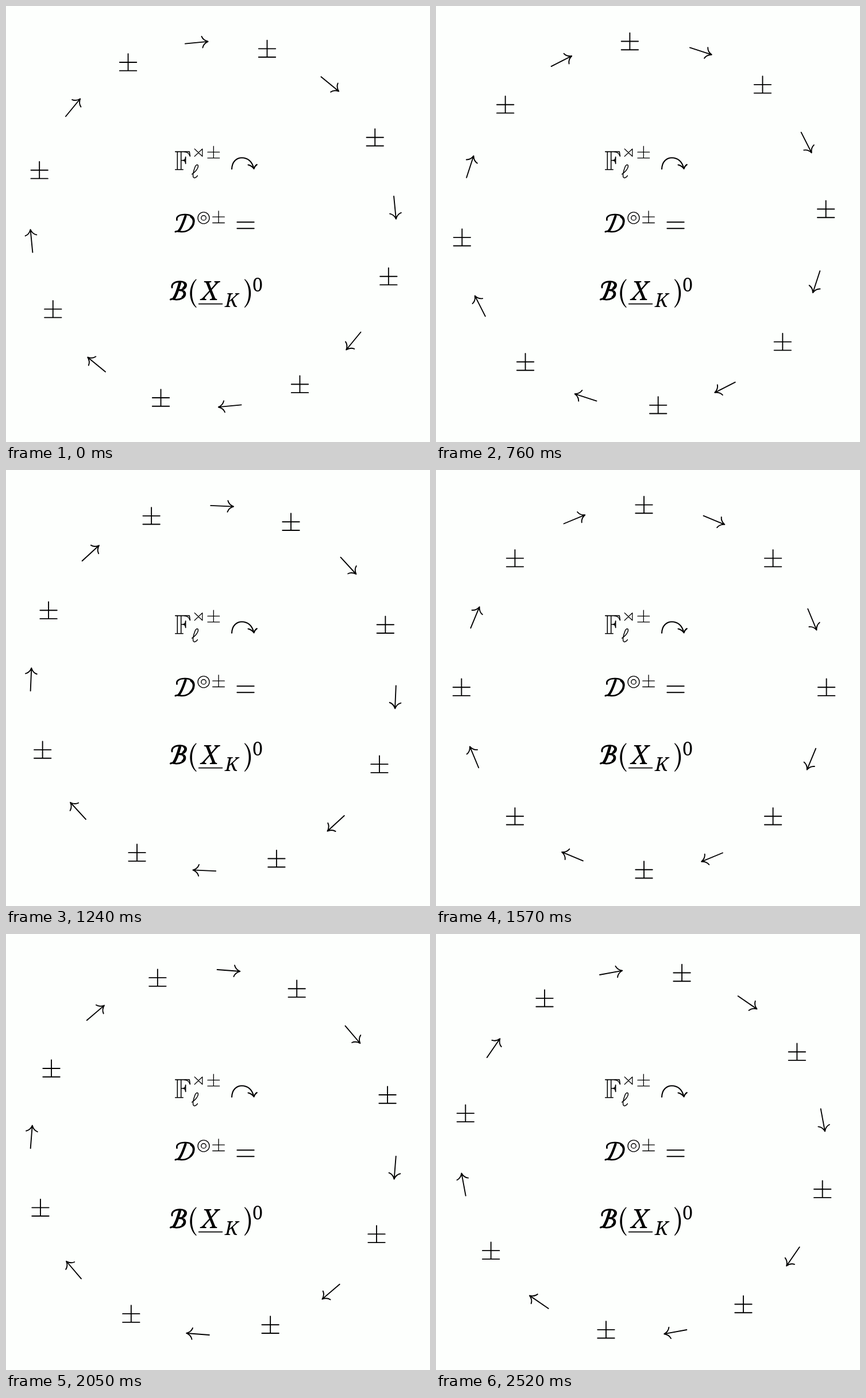
Recreate the animation shown at these times as an HTML page with a canvas. Size 738 by 759 pixels, loop 2560 ms.

```html
<!DOCTYPE html>
<html lang="en">
<head>
<meta charset="utf-8">
<title>Rotating symmetry ring</title>
<style>
html, body { margin: 0; width: 100%; height: 100%; overflow: hidden; background: #fdfffd; }
canvas { display: block; }
</style>
</head>
<body>
<canvas id="stage" width="738" height="759"></canvas>
<script>
const ctx = document.getElementById("stage").getContext("2d");
const LOOP = 2560, RADIUS = 317.6;

// Runs of steps: first time, last time, number of steps.
const runs = [[380, 900, 12], [950, 1430, 11], [1480, 2000, 12], [2050, 2520, 11]];
const times = [0];
for (const [from, to, n] of runs) {
  for (let i = 0; i < n; i++) {
    times.push(Math.round((from + (to - from) * i / (n - 1)) / 10) * 10);
  }
}

// Ring angle: step, degrees.
const keys = [[0, 16.93], [5, 28.93], [14, 55.07], [19, 69.95], [26, 90], [36, 117], [46, 147]];

function angleAt(t) {
  let step = 0;
  while (step + 1 < times.length && times[step + 1] <= t) step++;
  let i = 0;
  while (i < keys.length - 2 && keys[i + 1][0] <= step) i++;
  const [s0, a0] = keys[i], [s1, a1] = keys[i + 1];
  return a0 + (a1 - a0) * (step - s0) / (s1 - s0);
}

function stroke(d, width, cap = "round") {
  ctx.lineWidth = width;
  ctx.lineCap = cap;
  ctx.lineJoin = "round";
  ctx.stroke(new Path2D(d));
}

function fill(d) {
  ctx.fill(new Path2D(d));
}

function plusMinus(x, y, size = 1) {
  const r = 14.7 * size;
  stroke(`M${x - r} ${y}H${x + r}M${x} ${y - r}V${y + r}M${x - r} ${y + r}H${x + r}`, 1.88 * size);
}

function drawArrow(deg) {
  ctx.save();
  ctx.translate(360.7, 380);
  ctx.rotate(deg * Math.PI / 180);
  ctx.translate(1.8, -RADIUS);
  stroke("M-19.9 0H19.6M9.8 -9.9Q11.8 -2.8 20 0Q11.8 2.8 9.8 9.9", 1.88);
  ctx.restore();
}

function drawRing(deg) {
  for (let i = 0; i < 8; i++) {
    const a = (deg + i * 45) * Math.PI / 180;
    plusMinus(362 + RADIUS * Math.sin(a), 378.2 - RADIUS * Math.cos(a));
    drawArrow(deg + i * 45 + 22.5);
  }
}

// Places the ink of a character around x, on the baseline y.
function letter(ch, x, y, font) {
  ctx.font = font + " 'Noto Serif', 'Liberation Serif', serif";
  const m = ctx.measureText(ch);
  ctx.fillText(ch, x - (m.actualBoundingBoxRight - m.actualBoundingBoxLeft) / 2, y);
}

function drawTopLine() {
  // double-struck F
  stroke("M294.7 253.6H319.2L320.4 261.5M294.7 284.7H308.2M298.3 253.6V284.7M304.7 253.6V284.7" +
         "M304.7 268.7H312M312.6 262.8V274.4", 1.6);
  stroke("M310.5 253.8Q318 254.5 320.2 261.3M308 268.7Q312 268.2 312.6 263.3M308 268.7Q312 269.2 312.6 274", 1.3);
  // script l
  stroke("M323.6 292.8C328.5 289.6 334.8 283.1 334.4 278.4C334 275.1 330.6 276 329 280.2" +
         "C327 285.6 324.8 292.6 325.7 296.9C326.6 300.8 331.2 299.2 333.3 295.3", 1.5);
  stroke("M328.2 248.8L341.8 261.8M328.2 261.8L341.8 248.8M341.8 248.8V261.8", 1.25);
  plusMinus(361.3, 254.4, 0.7);
  // curved arrow
  stroke("M393 283.8C393.5 271 401 264.2 410.5 264.2C421 264.2 428.5 271 431 282", 2.1);
  stroke("M421.5 276.6Q428 278.3 431.6 283.3Q432.8 278.6 436.8 276", 2.1);
}

function drawMiddleLine() {
  // script D
  stroke("M312.5 365.6C309.5 374.6 305.5 386.6 300.5 391.6", 4.2);
  stroke("M297.5 372.6C296 366 302.5 363 311 363C321 362.8 327.6 366.8 327.2 374.6" +
         "C326.6 385 317 393 306.5 393C301.5 393 299 390.6 294.8 393", 2.7);
  stroke("M322 366.8C328.8 371 327.6 381 321 387", 3.6);
  ctx.lineWidth = 1.4;
  for (const r of [10, 4.2]) {
    ctx.beginPath();
    ctx.arc(344, 368.9, r, 0, 2 * Math.PI);
    ctx.stroke();
  }
  plusMinus(370, 367.2, 0.7);
  stroke("M402.3 376.2H431.7M402.3 387.2H431.7", 1.88);
}

function paren(x, y, dir) {
  const p = d => x + d * dir;
  fill(`M${p(10.6)} ${y - 25}C${p(-3.5)} ${y - 13} ${p(-3.5)} ${y + 13} ${p(10.6)} ${y + 25}` +
       `L${p(11.4)} ${y + 24}C${p(1)} ${y + 13} ${p(1)} ${y - 13} ${p(11.4)} ${y - 24}Z`);
}

function drawBottomLine() {
  // script B
  stroke("M302.5 482.5C300 491.5 296.5 503.5 292 509.2", 4.8);
  stroke("M289 490C288 483.5 294 479.8 302.5 479.8C309.5 479.8 314 482 313.5 486.4" +
         "C313 491.4 307.5 494.2 301.5 494.8C308 494.6 312.5 497.4 311.8 502" +
         "C311 507.8 303.5 511.2 296.5 511.1C292 511 290 508.6 286.3 511", 2.9);
  stroke("M310.3 482C313.4 484.7 312.2 488.8 308.8 491.4M309 497C311.8 499.7 311 504 307.3 507", 4);
  paren(320.3, 500.3, 1);
  letter("X", 355.3, 512, "italic 46px");
  stroke("M335 518.6H377", 1.9, "butt");
  letter("K", 393.4, 524.3, "italic 33.5px");
  paren(426.3, 500.3, -1);
  letter("0", 438, 496.7, "32px");
}

function draw(now) {
  ctx.fillStyle = "#fdfffd";
  ctx.fillRect(0, 0, 738, 759);
  ctx.fillStyle = ctx.strokeStyle = "#000";
  drawRing(angleAt(now % LOOP));
  drawTopLine();
  drawMiddleLine();
  drawBottomLine();
}

const start = performance.now();
function tick() {
  draw(performance.now() - start);
  requestAnimationFrame(tick);
}
tick();
</script>
</body>
</html>
```
